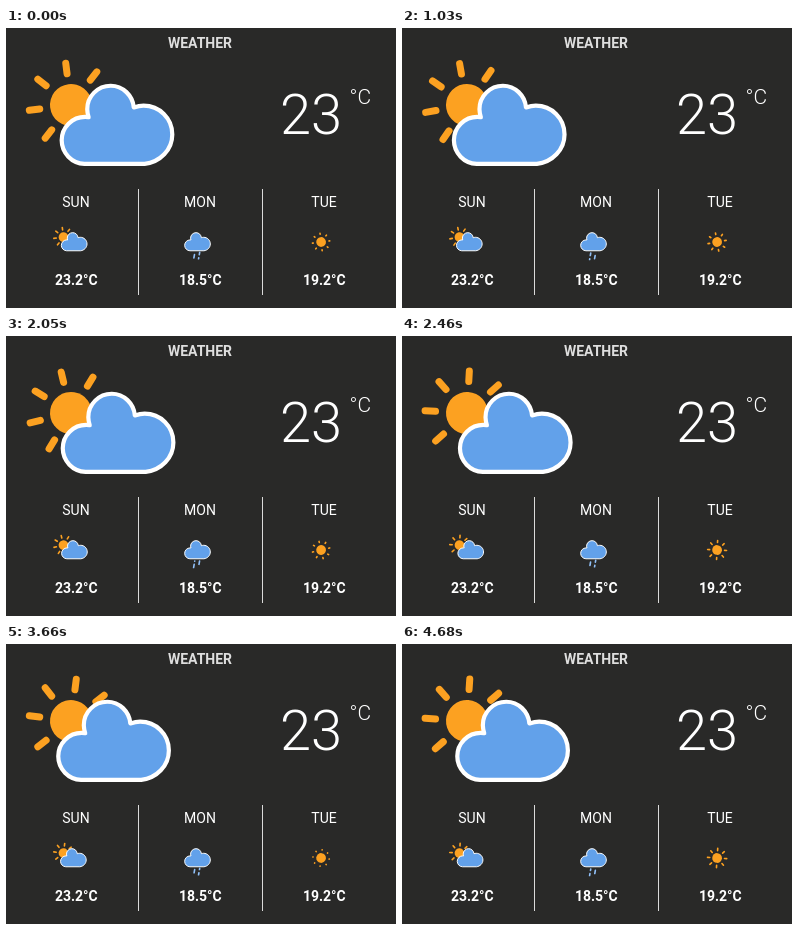
These frames come from a looping animation (390x280 px, 4730 ms). An HTML page with a canvas:

```html
<!DOCTYPE html>
<html lang="en">
<head>
<meta charset="utf-8">
<title>Weather</title>
<style>
  html, body { margin: 0; width: 100%; height: 100%; overflow: hidden; background: #292928; }
  canvas, svg { position: absolute; left: 0; top: 0; width: 390px; height: 280px; }
  text { font-family: Roboto, sans-serif; font-size: 14px; fill: #fff; }
  .mid { text-anchor: middle; }
  .bold { font-weight: 700; }
  .light { font-weight: 300; }
</style>
</head>
<body>
<canvas id="stage" width="390" height="280"></canvas>
<svg viewBox="0 0 390 280">
  <text class="mid bold" x="194" y="20" style="fill:#dedede">WEATHER</text>
  <text class="light" x="274" y="106" style="font-size:56px">23</text>
  <text class="light" x="343.5" y="76" style="font-size:21px">°C</text>
  <g fill="#dadada">
    <rect x="132" y="161" width="1" height="106"/>
    <rect x="256" y="161" width="1" height="106"/>
  </g>
  <text class="mid" x="70" y="179">SUN</text>
  <text class="mid" x="194" y="179">MON</text>
  <text class="mid" x="318" y="179">TUE</text>
  <text class="mid bold" x="70.3" y="257">23.2°C</text>
  <text class="mid bold" x="194.3" y="257">18.5°C</text>
  <text class="mid bold" x="318.3" y="257">19.2°C</text>
</svg>
<script>
const LOOP = 4730;
const PHASE = 2.07;   // seconds the icons have already run when the loop begins
const SPEED = 1.02;
const SMALL = 0.8125;
const ORANGE = '#fca121';

const ctx = document.getElementById('stage').getContext('2d');
const cloudShape = new Path2D('M47.7,35.4c0-4.6-3.7-8.2-8.2-8.2c-1,0-1.9,0.2-2.8,0.5' +
  'c-0.3-3.4-3.1-6.2-6.6-6.2c-3.7,0-6.7,3-6.7,6.7c0,0.8,0.2,1.6,0.4,2.3' +
  'c-0.3-0.1-0.7-0.1-1-0.1c-3.7,0-6.7,3-6.7,6.7c0,3.6,2.9,6.6,6.5,6.7l17.2,0' +
  'C44.2,43.3,47.7,39.8,47.7,35.4z');

const mod = (a, n) => ((a % n) + n) % n;

// 0 -> 1 -> 0 over one period
const triangle = (t, period) => 1 - Math.abs(1 - 2 * mod(t, period) / period);

function placed(x, y, scale, draw) {
  ctx.save();
  ctx.translate(x, y);
  ctx.scale(scale, scale);
  draw();
  ctx.restore();
}

function drawSun(x, y, t, shrink = 0) {
  const start = 9 + shrink;
  const length = 3 - 2.9 * shrink;
  ctx.save();
  ctx.translate(x, y);
  ctx.fillStyle = ctx.strokeStyle = ORANGE;
  ctx.lineWidth = 2;
  ctx.lineCap = 'round';
  ctx.rotate(t * 2 * Math.PI / 9);
  for (let i = 0; i < 8; i++) {
    ctx.beginPath();
    ctx.moveTo(0, start);
    ctx.lineTo(0, start + length);
    ctx.stroke();
    ctx.rotate(Math.PI / 4);
  }
  ctx.beginPath();
  ctx.arc(0, 0, 6, 0, 2 * Math.PI);
  ctx.fill();
  ctx.restore();
}

function drawCloud(shift) {
  ctx.save();
  ctx.translate(shift, -1);
  ctx.fillStyle = '#62a1ea';
  ctx.strokeStyle = '#fff';
  ctx.lineWidth = 1.2;
  ctx.lineJoin = 'round';
  ctx.fill(cloudShape);
  ctx.stroke(cloudShape);
  ctx.restore();
}

function drawRain(x, y, t) {
  ctx.save();
  ctx.translate(x, y);
  ctx.rotate(Math.PI / 18);
  ctx.strokeStyle = '#91c0f8';
  ctx.lineWidth = 2;
  ctx.lineCap = 'round';
  ctx.setLineDash([4, 4]);
  ctx.lineDashOffset = -mod(t * 12.5, 8);
  ctx.beginPath();
  ctx.moveTo(0, 0);
  ctx.lineTo(0, 8);
  ctx.stroke();
  ctx.restore();
}

function drawCloudyDay(t) {
  drawSun(20, 26, t);
  drawCloud(2 * triangle(t, 3));
}

function drawRainy(t) {
  drawCloud(0.4);
  drawRain(28.9, 45.7, t);
  drawRain(35, 44.8, t - 0.25);
}

function render(ms) {
  const t = PHASE + SPEED * ms / 1000;
  ctx.clearRect(0, 0, 390, 280);
  placed(-5, -14, 3.5, () => drawCloudyDay(t));
  placed(41.25, 188, SMALL, () => drawCloudyDay(t));
  placed(165.25, 188, SMALL, () => drawRainy(t));
  placed(289.1, 188, SMALL, () => drawSun(32, 32, t, triangle(t - 0.76, 2)));
}

const began = performance.now();
function tick() {
  render((performance.now() - began) % LOOP);
  requestAnimationFrame(tick);
}
tick();
</script>
</body>
</html>
```
